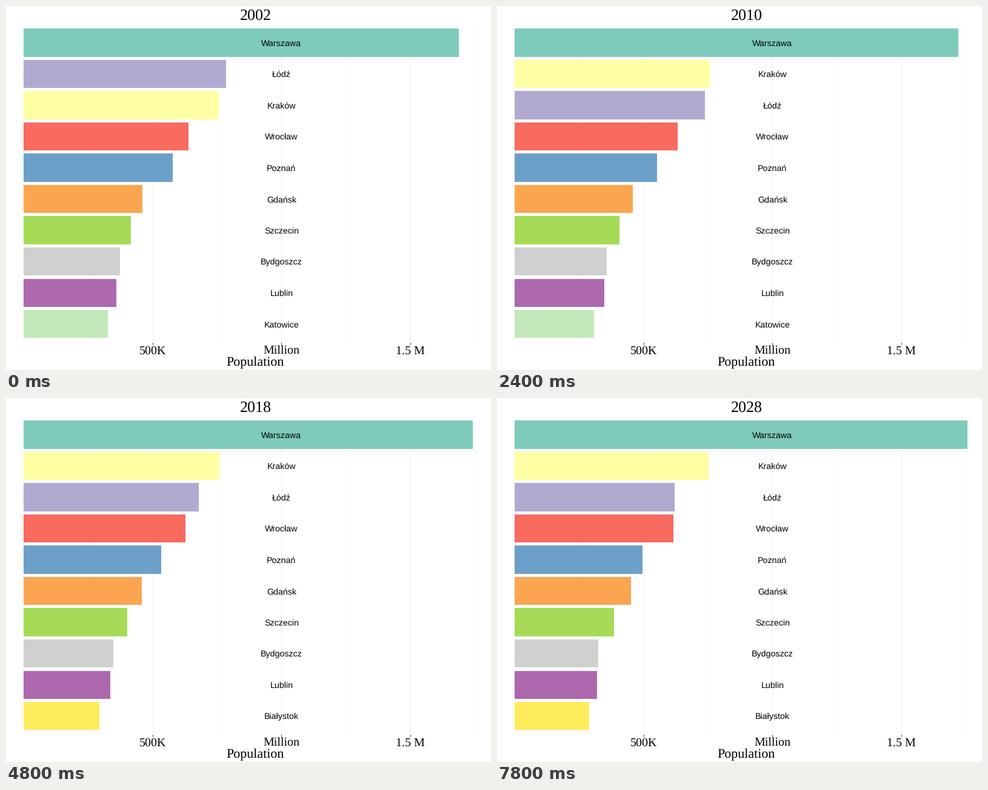
Write a matplotlib script that moves like this. It is 800x600 px and loops after 8 s.

```python
import matplotlib.pyplot as plt
import numpy as np
from matplotlib.animation import FuncAnimation
from matplotlib.patches import Rectangle

plt.rcParams["text.hinting"] = "none"

DPI = 100
ZERO_X, PX_PER_K = 29.2, 0.4252
TOP_Y, PITCH, BAR_H = 60.4, 51.54, 46.4
PANEL_TOP, PANEL_BOTTOM = 29.5, 555.1
FIRST_YEAR, STEPS_PER_YEAR, ROWS = 2002, 3, 10

# Colour, then population in thousands at each key year, steady in between
KEY_YEARS = (2002, 2010, 2017, 2028)
CITIES = {
    "Warszawa": ("#7ecbbb", 1688, 1720, 1740, 1756),
    "Łódź": ("#b0aad0", 785, 737, 686, 620),
    "Kraków": ("#ffffa3", 757, 757, 759, 753),
    "Wrocław": ("#f96a5f", 639, 633, 628, 616),
    "Poznań": ("#6da0c9", 578, 553, 536, 496),
    "Gdańsk": ("#fca550", 461, 457, 460, 451),
    "Szczecin": ("#a5db57", 415, 406, 404, 385),
    "Bydgoszcz": ("#d0d0d0", 373, 357, 350, 324),
    "Lublin": ("#ad68ae", 359, 348, 338, 319),
    "Katowice": ("#c2e8b9", 326, 307, 296, 271),
    "Białystok": ("#ffec5d", 292, 295, 295, 289),
}


def px(pixels):
    """Pixel size as points."""
    return pixels * 72 / DPI


def x_at(thousands):
    return ZERO_X + PX_PER_K * thousands


fig = plt.figure(figsize=(800 / DPI, 600 / DPI), dpi=DPI, facecolor="white")
ax = fig.add_axes([0, 0, 1, 1])
ax.set(xlim=(0, 800), ylim=(600, 0))
ax.axis("off")


def write(x, y, text, size, family="Liberation Serif"):
    return ax.text(x, y, text, fontsize=px(size), family=family, color="black",
                   ha="center", va="baseline", zorder=4)


def vline(x, top, bottom, color, width):
    ax.plot([x, x], [top, bottom], color=color, lw=px(width), zorder=1,
            solid_capstyle="butt")


for value in range(250, 2000, 500):
    vline(x_at(value), PANEL_TOP, PANEL_BOTTOM, "#f0f0f0", 0.5)
for value, label in ((500, "500K"), (1000, "Million"), (1500, "1.5 M")):
    vline(x_at(value), PANEL_TOP, PANEL_BOTTOM, "#f0f0f0", 1)
    vline(x_at(value), PANEL_BOTTOM, PANEL_BOTTOM + 2.8, "#333333", 1.1)
    write(x_at(value), 574, label, 20)
write(411.4, 592, "Population", 22)
title = write(411.7, 23, "", 26)

bars, labels = [], []
for row in range(ROWS):
    y = TOP_Y + row * PITCH
    bar = Rectangle((ZERO_X, y - BAR_H / 2), 0, BAR_H, lw=0, zorder=2, snap=True)
    bars.append(ax.add_patch(bar))
    labels.append(write(x_at(1000), y + 5.3, "", 14.2, "Liberation Sans"))


def update(step):
    year = FIRST_YEAR + step // STEPS_PER_YEAR
    size = {name: np.interp(year, KEY_YEARS, values)
            for name, (_, *values) in CITIES.items()}
    ranking = sorted(size, key=size.get, reverse=True)
    for name, bar, label in zip(ranking, bars, labels):
        bar.set_width(PX_PER_K * size[name])
        bar.set_facecolor(CITIES[name][0])
        label.set_text(name)
    title.set_text(str(year))
    return [*bars, *labels, title]


anim = FuncAnimation(fig, update, frames=80, interval=100, repeat=True, repeat_delay=0)
plt.show()
```
